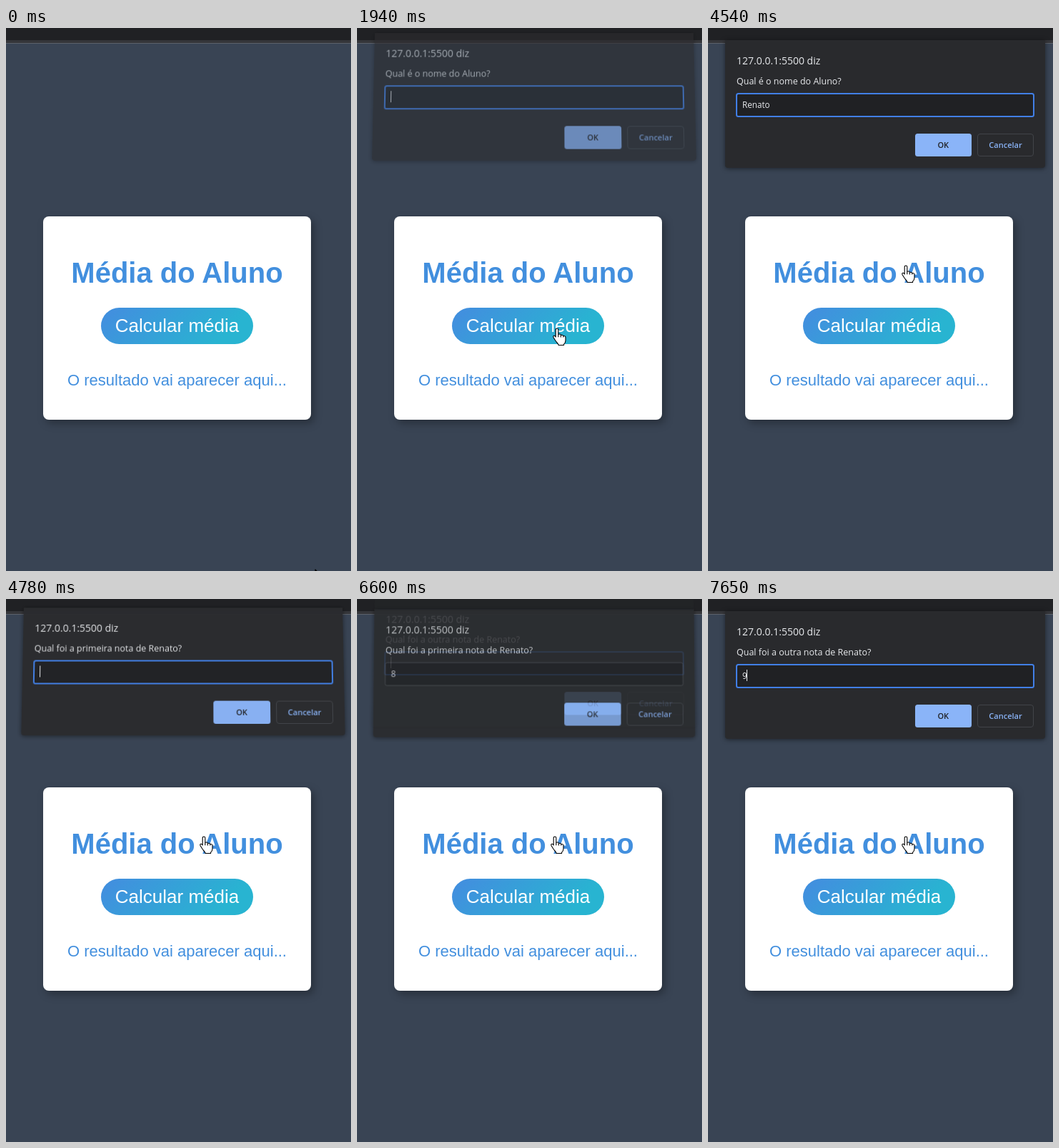
An HTML page for the animation above (8 s loop, 483x761 px).

```html
<!DOCTYPE html>
<html lang="pt-BR">
<head>
<meta charset="utf-8">
<title>Média do Aluno</title>
<style>
  html, body { margin: 0; width: 100%; height: 100%; overflow: hidden; background: #394454; }
  svg { position: absolute; left: 0; top: 0; width: 483px; height: 761px; }
  .page text { font-family: "Liberation Sans", Arial, sans-serif; text-anchor: middle; fill: #428fde; }
  .card { filter: drop-shadow(4px 5px 6px rgba(0, 0, 0, .3)); }
  .dialog { transform-origin: 248px 106px; }
  .dialog text { font-family: "Open Sans", "Noto Sans", sans-serif; fill: #e8eaed; }
  .dialog .label { font-size: 11px; font-weight: 600; text-anchor: middle; }
  .panel { filter: drop-shadow(0 1px 3px rgba(0, 0, 0, .5)); }
  .cursor { fill: #fff; stroke: #000; stroke-width: 1.1; stroke-linejoin: round; }
</style>
</head>
<body>
<svg class="page" viewBox="0 0 483 761">
  <defs>
    <linearGradient id="pill" x1="0" y1="0" x2="1" y2=".25">
      <stop offset=".1" stop-color="#4190de"/>
      <stop offset=".95" stop-color="#28b4d1"/>
    </linearGradient>
  </defs>
  <rect width="483" height="17" fill="#202124"/>
  <rect y="17" width="483" height="4" fill="#35363a"/>
  <rect y="21" width="483" height="1" fill="#5d626b"/>
  <rect class="card" x="52" y="264" width="375" height="285" rx="8" fill="#fff"/>
  <text x="239.5" y="357" font-size="40" font-weight="700">Média do Aluno</text>
  <rect x="133" y="392" width="213" height="51" rx="25.5" fill="url(#pill)"/>
  <text x="239.5" y="426" font-size="26" style="fill:#fff">Calcular média</text>
  <text x="239.5" y="501" font-size="22">O resultado vai aparecer aqui...</text>
</svg>
<div id="dialogs"></div>
<svg viewBox="0 0 483 761">
  <g class="cursor" id="cursor">
    <path id="arrow" d="M0 0v17l4-3.8 2.6 6 2.6-1.1-2.6-6h5.4z"/>
    <g id="hand">
      <path d="M-1.8 1.8a1.8 1.8 0 0 1 3.6 0V8.2q3.2-.8 3.6 1.2q3-.6 3.4 1.2q3-.4 3.2 2V17q0 3-2.4 5.2V23.5H2.2q-.5-2-3-4.5-2-2.5-4.2-6.5-.8-2.5 1.4-2.2 1 .2 1.8 1.8z"/>
      <path fill="none" d="M1.8 8.2v4M5.4 9.4v3M8.8 10.6v2"/>
    </g>
  </g>
</svg>
<script>
const LOOP = 8000;
const CLOSE_MS = 150;
const STUDENT = 'Renato';

// keys: times at which each character is typed; dark: spans with the caret blinked off
const dialogs = [
  { prompt: 'Qual é o nome do Aluno?', answer: STUDENT, keys: [2920, 3110, 3310, 3560, 3690, 3990],
    open: 1885, rise: 165, close: 4620, dark: [[2430, 2920], [4490, 4620]] },
  { prompt: `Qual foi a primeira nota de ${STUDENT}?`, answer: '8', keys: [5770],
    open: 4700, rise: 140, close: 6560, dark: [[5100, 5620], [6290, 6560]] },
  { prompt: `Qual foi a outra nota de ${STUDENT}?`, answer: '9', keys: [7650],
    open: 6585, rise: 215, close: LOOP, dark: [[7140, 7650]] },
];

// time, x, y of the pointer tip
const path = [
  [0, 433, 759], [150, 430, 735], [300, 419, 668], [430, 403, 625], [560, 383, 577],
  [700, 330, 500], [820, 286, 440], [1020, 281, 431], [1430, 280, 421], [1620, 280, 421],
  [1680, 275, 408], [1750, 280, 421], [1950, 280, 421], [2270, 277, 333],
];

const byId = id => document.getElementById(id);
const clamp = v => Math.max(0, Math.min(1, v));

for (const d of dialogs) {
  byId('dialogs').insertAdjacentHTML('beforeend', `
    <svg class="dialog" viewBox="0 0 483 761">
      <path class="panel" d="M24 17H472V192a4 4 0 0 1-4 4H28a4 4 0 0 1-4-4z" fill="#292a2d"/>
      <text x="40" y="51" font-size="14">127.0.0.1:5500 diz</text>
      <text x="40" y="79" font-size="12.5">${d.prompt}</text>
      <rect class="field" x="40" y="92" width="416" height="32" rx="2.5" fill="#202124"/>
      <text class="answer" x="48" y="112" font-size="11.7"></text>
      <rect class="caret" y="99" width="1" height="16" fill="#e8eaed"/>
      <rect x="290" y="148" width="79" height="32" rx="3.5" fill="#8ab4f8"/>
      <text class="label" x="329.3" y="168" style="fill:#202124">OK</text>
      <rect x="377.5" y="148.5" width="78" height="31" rx="3.5" fill="none" stroke="#414449"/>
      <text class="label" x="416.5" y="168" style="fill:#8ab4f8">Cancelar</text>
    </svg>`);
  d.svg = byId('dialogs').lastElementChild;
  for (const part of ['field', 'answer', 'caret']) d[part] = d.svg.querySelector('.' + part);
}

function drawDialog(d, t) {
  const visible = t >= d.open && t < d.close + CLOSE_MS;
  d.svg.style.display = visible ? '' : 'none';
  if (!visible) return;

  const closing = t >= d.close;
  const leaving = clamp((t - d.close) / CLOSE_MS);
  const lift = closing ? 10 * leaving : 20 * (1 - clamp((t - d.open) / d.rise)) ** 1.5;
  const tilt = Math.min(1, lift / 6);
  d.svg.style.opacity = closing ? 1 - leaving ** 2 : clamp((20 - lift) / 15);
  d.svg.style.transform = lift
    ? `perspective(1000px) translate3d(0, ${-lift}px, ${4.5 * tilt}px) rotateX(${5.7 * tilt}deg)`
    : 'none';

  d.answer.textContent = d.answer_text = d.answer_value(t);
  d.field.setAttribute('stroke', closing ? '#4a4d52' : '#417fe6');
  d.field.setAttribute('stroke-width', closing ? 1 : 2);
  const typedWidth = d.answer_text ? d.answer.getComputedTextLength() : 0;
  d.caret.setAttribute('x', Math.round(47.5 + typedWidth));
  const lit = !closing && !d.dark.some(([from, to]) => t >= from && t < to);
  d.caret.style.display = lit ? '' : 'none';
}

for (const d of dialogs) {
  const full = dialogs.indexOf(d) === 0 ? STUDENT : d.prompt.includes('outra') ? '9' : '8';
  d.answer_value = t => full.slice(0, d.keys.filter(key => key <= t).length);
}

function drawCursor(t) {
  const next = path.findIndex(point => point[0] > t);
  let [, x, y] = path[path.length - 1];
  if (next > 0) {
    const [t0, x0, y0] = path[next - 1], [t1, x1, y1] = path[next];
    const k = (t - t0) / (t1 - t0);
    x = x0 + (x1 - x0) * k;
    y = y0 + (y1 - y0) * k;
  }
  const overButton = y < 443;
  byId('cursor').setAttribute('transform', `translate(${Math.round(x)} ${Math.round(y)})`);
  byId('hand').style.display = overButton ? '' : 'none';
  byId('arrow').style.display = overButton ? 'none' : '';
}

const start = performance.now();
function frame() {
  const t = (performance.now() - start) % LOOP;
  dialogs.forEach(d => drawDialog(d, t));
  drawCursor(t);
  requestAnimationFrame(frame);
}
frame();
</script>
</body>
</html>
```
